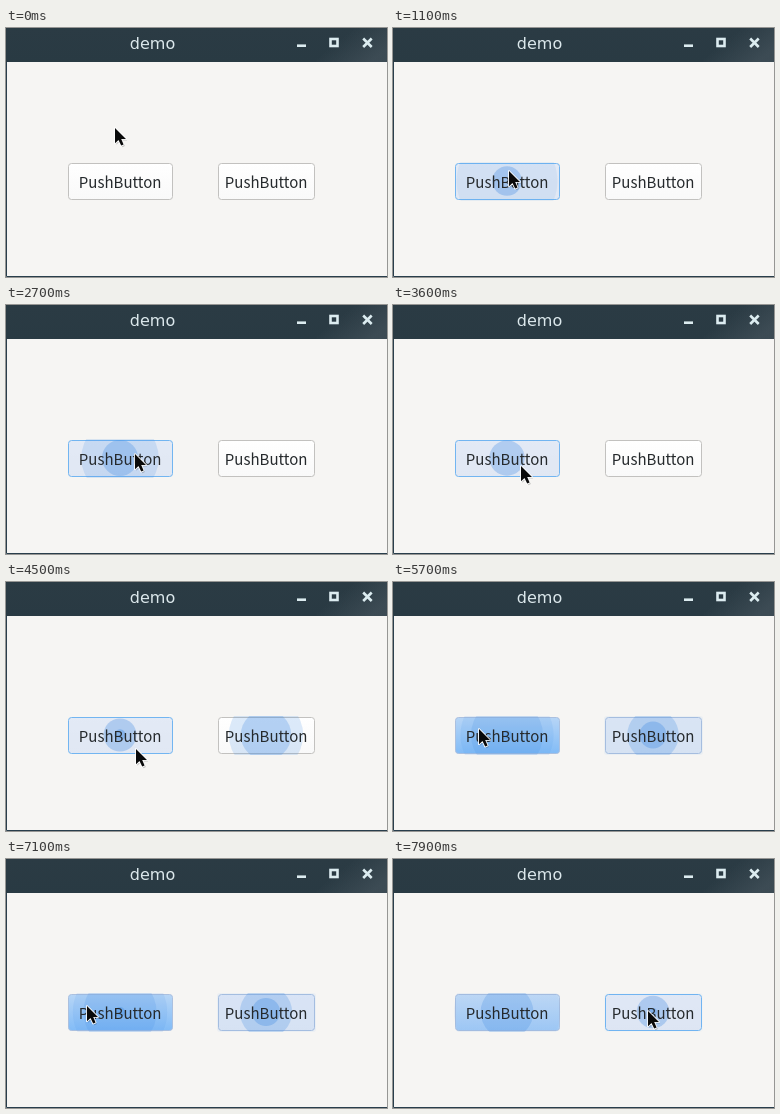
An HTML page that plays this animation: 381x249 px, repeating every 8 s.

```html
<!DOCTYPE html>
<html lang="en">
<head>
<meta charset="utf-8">
<title>demo</title>
<style>
html, body { margin: 0; width: 100%; height: 100%; overflow: hidden; background: #f6f5f3; }
svg { display: block; width: 381px; height: 249px; }
.title { font: 16px "DejaVu Sans", sans-serif; fill: #dce8ec; }
.label { font: 15px "Noto Sans CJK SC", "Noto Sans CJK JP", "Noto Sans CJK", "Noto Sans", sans-serif; fill: #25292c; }
</style>
</head>
<body>
<svg id="stage" viewBox="0 0 381 249" xmlns="http://www.w3.org/2000/svg">
  <defs>
    <linearGradient id="bar" x1="0" y1="0" x2="0" y2="1">
      <stop offset="0" stop-color="#2b3b44"/><stop offset="1" stop-color="#293a43"/>
    </linearGradient>
    <linearGradient id="sheen" x1="0" y1="0" x2="1" y2=".6">
      <stop offset=".4" stop-color="#44525b" stop-opacity="0"/><stop offset="1" stop-color="#44525b" stop-opacity=".7"/>
    </linearGradient>
    <linearGradient id="plain" x1="0" y1="0" x2="0" y2="1">
      <stop offset="0" stop-color="#fff"/><stop offset="1" stop-color="#f9f9f9"/>
    </linearGradient>
    <linearGradient id="pressed" x1="0" y1="0" x2="0" y2="1">
      <stop offset="0" stop-color="#b2d3f6"/><stop offset="1" stop-color="#78b7f7"/>
    </linearGradient>
  </defs>
  <rect width="381" height="249" fill="#f6f5f3"/>
  <rect width="381" height="34" fill="url(#bar)"/>
  <rect x="310" width="71" height="34" fill="url(#sheen)"/>
  <path d="M.5 34V248.5H381" fill="none" stroke="#293e4c"/>
  <text class="title" x="146.5" y="21" text-anchor="middle">demo</text>
  <g fill="none" stroke="#dcecf0" stroke-width="2.6">
    <path d="M291 17.7H300"/>
    <rect x="324.5" y="11" width="7" height="7"/>
    <path d="M357.2 10.5L365.7 19M365.7 10.5L357.2 19"/>
  </g>
  <g id="buttons"></g>
  <g id="cursor">
    <path d="M0 0V15.2L3.5 12L6.2 17.6L8.6 16.5L6.2 11H11Z" fill="#000" opacity=".2" transform="translate(1.3 1.6)"/>
    <path d="M0 0V15.2L3.5 12L6.2 17.6L8.6 16.5L6.2 11H11Z" fill="#0a0a0a" stroke="#fff" stroke-width="1.7" stroke-linejoin="round" paint-order="stroke"/>
  </g>
</svg>
<script>
const NS = "http://www.w3.org/2000/svg";
const LOOP = 8000, STEP = 100;
const TOP = 135.5, HEIGHT = 36;
const RIPPLE_SPEED = .06, RIPPLE_R = 65, RIPPLE_MS = RIPPLE_R / RIPPLE_SPEED;
const CLICKS_FROM = 4550, PRESS_DECAY = 800;
const SHUTTLE_FROM = 3800, PAUSE_AT = 7100, PAUSE_MS = 272;

// Time, x, y of the pointer tip before it starts to shuttle
const opening = [
  [0, 109, 100], [400, 111, 155], [700, 113, 125], [1000, 115, 146], [1100, 116, 143],
  [1600, 158, 168], [1900, 150, 176], [2200, 140, 167], [2350, 136, 175], [2700, 129, 149],
  [3100, 118, 94], [3400, 130, 155], [SHUTTLE_FROM, 126, 166]
];

const buttons = [
  { x: 62.5, width: 104, visits: [], presses: true },
  { x: 212.5, width: 96, visits: [], presses: false }
];

function set(node, attrs) {
  for (const key in attrs) node.setAttribute(key, attrs[key]);
}

function add(parent, tag, attrs) {
  const node = document.createElementNS(NS, tag);
  set(node, attrs);
  parent.append(node);
  return node;
}

const clamp = (v, lo, hi) => Math.min(hi, Math.max(lo, v));
const lerp = (a, b, u) => a + (b - a) * u;

// Loops across both buttons, with one rest on the left
function shuttle(t) {
  const moving = t - clamp(t - PAUSE_AT, 0, PAUSE_MS);
  const angle = (143 + .517 * (moving - 5700)) * Math.PI / 180;
  return [190 + 130 * Math.cos(angle), 154.5 - 8 * Math.sin(angle) - 9 * Math.cos(2 * angle)];
}

function pointer(t) {
  if (t >= SHUTTLE_FROM) return shuttle(t);
  const next = opening.findIndex(k => k[0] > t);
  const [t0, x0, y0] = opening[next - 1], [t1, x1, y1] = opening[next];
  const u = (t - t0) / (t1 - t0);
  return [lerp(x0, x1, u), lerp(y0, y1, u)];
}

function isOver(button, [x, y]) {
  return x > button.x && x < button.x + button.width && y > TOP && y < TOP + HEIGHT;
}

// Each entry of the pointer starts a ripple
function findVisits(button) {
  let inside = false;
  for (let t = 0; t < LOOP; t += 5) {
    const now = isOver(button, pointer(t));
    if (now && !inside) button.visits.push(t);
    inside = now;
  }
}

function build(button, i) {
  const { x, width } = button, cx = x + width / 2;
  const box = { x, y: TOP, width, height: HEIGHT, rx: 3 };
  const group = add(document.getElementById("buttons"), "g", {});
  const clip = add(group, "clipPath", { id: "clip" + i });
  add(clip, "rect", { x: x - 1.5, y: TOP - 1.5, width: width + 3, height: HEIGHT + 3, rx: 3 });
  add(group, "rect", { ...box, fill: "url(#plain)" });
  button.wash = add(group, "rect", { ...box, fill: "#d0dcf0" });
  button.press = add(group, "rect", { ...box, fill: "url(#pressed)" });
  button.border = add(group, "rect", { ...box, fill: "none" });
  const layer = add(group, "g", { "clip-path": `url(#clip${i})`, fill: "#4a90e2" });
  button.circles = button.visits.map(() => add(layer, "circle", { cx: cx - .5, cy: 153 }));
  add(group, "text", { x: cx - .3, y: 160, "text-anchor": "middle", class: "label" }).textContent = "PushButton";
}

function drawButton(button, t, tip) {
  const hover = isOver(button, tip);
  const active = hover || t > CLICKS_FROM;
  const click = button.visits.filter(v => v <= t && v > CLICKS_FROM).pop();
  const press = button.presses && click ? Math.exp((click - t) / PRESS_DECAY) : 0;
  const idle = active ? "#abc0df" : "#c2c1bf";
  set(button.wash, { opacity: active ? .6 : 0 });
  set(button.press, { opacity: press });
  set(button.border, { stroke: hover && press < .8 ? "#72b5f1" : idle });
  button.circles.forEach((circle, i) => {
    const age = (t - button.visits[i]) / RIPPLE_MS;
    const live = age > 0 && age < 1;
    set(circle, { r: live ? RIPPLE_R * age : 0, opacity: live ? .45 * (1 - age) : 0 });
  });
}

const cursor = document.getElementById("cursor");

function draw(t) {
  const tip = pointer(t);
  set(cursor, { transform: `translate(${tip.map(Math.round).join(" ")})` });
  buttons.forEach(button => drawButton(button, t, tip));
}

buttons.forEach(findVisits);
buttons.forEach(build);

const start = performance.now();
function tick() {
  const t = (performance.now() - start) % LOOP;
  draw(Math.floor(t / STEP) * STEP);
  requestAnimationFrame(tick);
}
tick();
</script>
</body>
</html>
```
